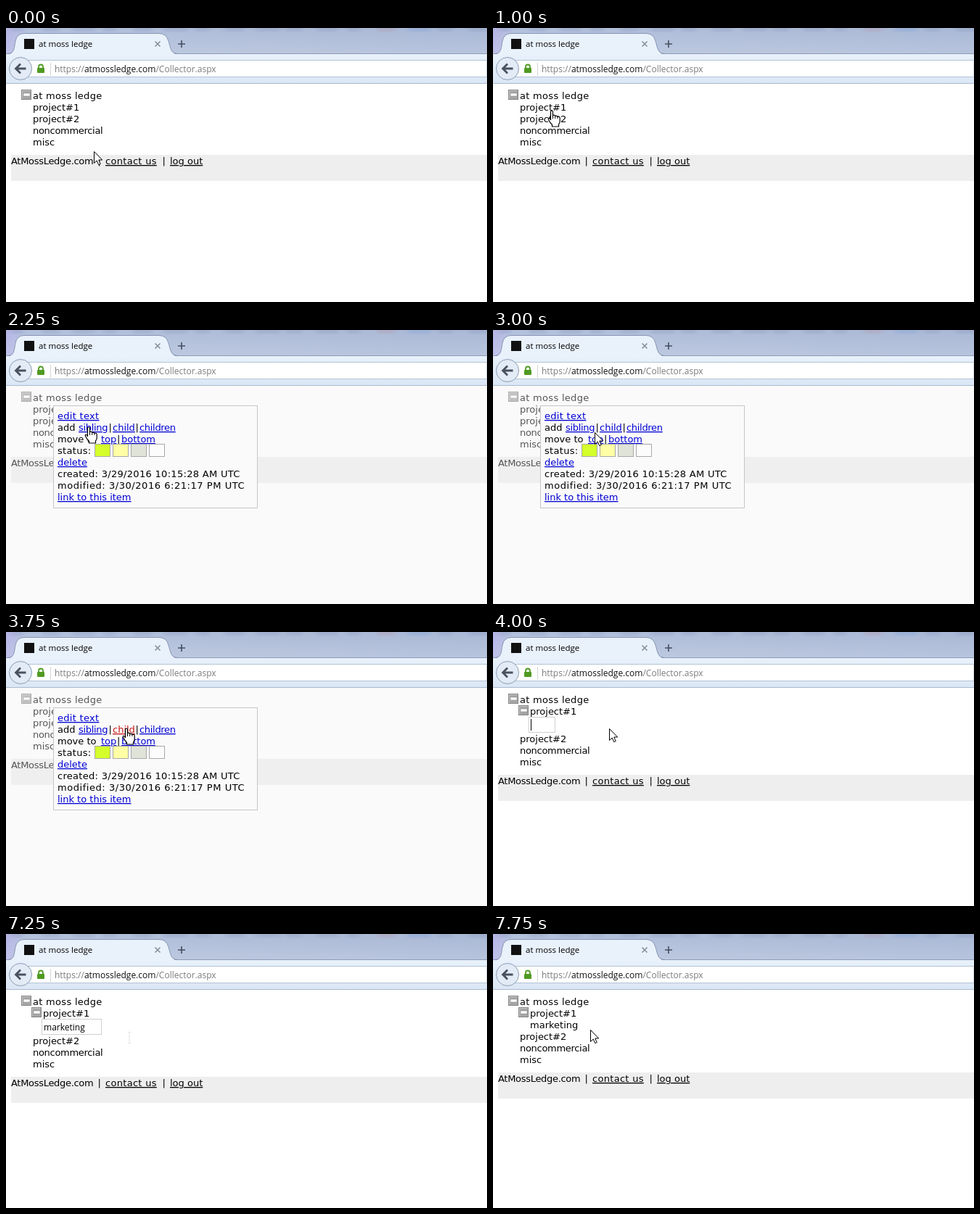
An HTML page that plays this animation: 663 by 378 pixels, repeating every 8000 ms.

```html
<!DOCTYPE html>
<html lang="en">
<head>
<meta charset="utf-8">
<title>at moss ledge</title>
<style>
html, body { margin: 0; width: 100%; height: 100%; overflow: hidden; background: #fff; }
svg { display: block; width: 663px; height: 378px; }
text { font: 13px "DejaVu Sans", sans-serif; white-space: pre; }
.ui { font: 12px "Open Sans", sans-serif; }
.tab { font-size: 11.5px; }
.u { text-decoration: underline; }
.link { fill: #0000d4; text-decoration: underline; }
.link.hot { fill: #c81414; }
.tight { letter-spacing: -.3px; }
.loose { letter-spacing: .3px; }
.wide { letter-spacing: .55px; }
</style>
</head>
<body>
<svg viewBox="0 0 663 378">
  <defs>
    <linearGradient id="sky" x2="1">
      <stop offset="0" stop-color="#b5b4e6"/>
      <stop offset=".04" stop-color="#b2c0dc"/>
      <stop offset=".6" stop-color="#adbbd7"/>
      <stop offset="1" stop-color="#a9b8d6"/>
    </linearGradient>
    <linearGradient id="shade" x2="0" y2="1">
      <stop offset="0" stop-color="#fff" stop-opacity="0"/>
      <stop offset="1" stop-color="#fff" stop-opacity=".18"/>
    </linearGradient>
    <linearGradient id="bar" x2="0" y2="1">
      <stop offset="0" stop-color="#e8f1fb"/>
      <stop offset="1" stop-color="#dbe7f5"/>
    </linearGradient>
    <filter id="blur"><feGaussianBlur stdDeviation="3 1.6"/></filter>
    <g id="fold">
      <rect x=".5" y=".5" width="13" height="13" fill="#a6a6a6" stroke="#858585"/>
      <path d="M1.500 12.500V1.500H12.500" fill="none" stroke="#c6c6c6"/>
      <rect x="3" y="5" width="9" height="4" fill="#fff" stroke="#8c8c8c" stroke-width=".6"/>
    </g>
    <path id="arrow" d="M.5 .5V16.500L4.200 13 6.700 18.700 9.200 17.600 6.800 12H11.700Z" fill="#fff" stroke="#000"/>
    <g id="hand">
      <path d="M-1.500 13V1.500Q-1.500 0 0 0T1.500 1.500V6.500Q4 5.600 4.700 7.400 7 6.600 7.800 8.400 11.200 7.600 11.200 10.500V15Q11 17.500 9.500 19V22H.5V19.500Q-2.500 16.500-4.500 12.500-5.200 10.300-3.500 10.300-2.500 10.600-1.500 13Z" fill="#fff" stroke="#000" stroke-width="1.200"/>
      <path d="M1.500 6.500V11M4.700 7.500V11M7.900 8.500V11" stroke="#000"/>
    </g>
    <path id="beam" d="M-2 -7.500H2M0 -7.500V7.500M-2 7.500H2" fill="none" stroke="#e2e2e2"/>
  </defs>

  <rect width="663" height="378" fill="#fff"/>
  <rect width="663" height="37" fill="url(#sky)"/>
  <g id="smudges" filter="url(#blur)" opacity=".25"></g>
  <rect width="663" height="37" fill="url(#shade)"/>
  <rect y="36" width="663" height="40" fill="url(#bar)"/>
  <path d="M0 35.500H6M232 35.500H663" stroke="#8d9cb8"/>
  <path d="M0 76.500H663" stroke="#a9b9cc"/>
  <path d="M2 37C12 36 11 28 13 18Q15 7.500 25 7.500H211Q221 7.500 224 18C227 28 227 36 237 37Z" fill="#e9f1fb"/>
  <path d="M2 35.500C12 35 11 28 13 18Q15 7.500 25 7.500H211Q221 7.500 224 18C227 28 227 35 237 35.500" fill="none" stroke="#8796b2"/>
  <rect x="25" y="15" width="14" height="14" fill="#111"/>
  <text class="ui tab" x="45" y="26">at moss ledge</text>
  <path d="M205.500 18.500L212.500 25.500M212.500 18.500L205.500 25.500" stroke="#868e98" stroke-width="1.600"/>
  <path d="M237 22H247M242 17V27" stroke="#444e60" stroke-width="1.600"/>
  <path d="M30 44.500H663V67.500H30Z" fill="#fff" stroke="#b4c2d4"/>
  <circle cx="20" cy="56" r="15.500" fill="#e2ebf6" stroke="#8d9db3"/>
  <path d="M27.500 56H14M20 49.500L13.500 56 20 62.500" fill="none" stroke="#48525f" stroke-width="2.800"/>
  <path d="M45 56V53.500A3 3 0 0 1 51 53.500V56" fill="none" stroke="#4f9a22" stroke-width="1.800"/>
  <rect x="43" y="55" width="10" height="7" rx="1" fill="#4f9a22"/>
  <path d="M61.500 48V66" stroke="#d4d4d4"/>
  <text class="ui" x="67" y="61" fill="#7c7c7c">https://<tspan fill="#111">atmossledge.com</tspan>/Collector.aspx</text>

  <use href="#fold" x="21" y="85"/>
  <text class="loose" x="37" y="98">at moss ledge</text>
  <use id="fold1" href="#fold" x="35" y="101"/>
  <text id="first" y="114">project#1</text>
  <text id="child" x="51" y="130">marketing</text>
  <g id="rest">
    <text x="37" y="130">project#2</text>
    <text class="tight" x="37" y="146">noncommercial</text>
    <text x="37" y="162">misc</text>
    <rect x="7" y="175" width="656" height="36" fill="#eee"/>
    <text class="tight" x="7" y="188">AtMossLedge.com</text>
    <text x="126.500" y="188">|</text>
    <text class="u loose" x="137" y="188">contact us</text>
    <text x="215.500" y="188">|</text>
    <text class="u" x="226" y="188">log out</text>
  </g>

  <g id="field">
    <rect id="box" x="49.500" y="117.500" height="21" fill="#fff" stroke="#cfcfcf"/>
    <text id="typed" class="ui" x="52" y="133"></text>
    <path id="caret" d="M.5 120V136" stroke="#000"/>
  </g>

  <g id="menu">
    <rect y="77" width="663" height="301" fill="#f1f1f1" opacity=".353"/>
    <rect x="65.500" y="104.500" width="281" height="141" fill="#fafafa" stroke="#c6c6c6"/>
    <text class="link loose" x="71" y="123">edit text</text>
    <text x="71" y="139">add</text>
    <text class="link tight" x="100" y="139">sibling</text>
    <text x="141.500" y="139">|</text>
    <text id="add" class="link" x="147" y="139">child</text>
    <text x="178.500" y="139">|</text>
    <text class="link tight" x="184" y="139">children</text>
    <text x="71" y="155">move to</text>
    <text class="link" x="131" y="155">top</text>
    <text x="153" y="155">|</text>
    <text class="link" x="159" y="155">bottom</text>
    <text class="loose" x="71" y="171">status:</text>
    <g id="swatches" stroke="#a8a8a8"></g>
    <text class="link" x="71" y="187">delete</text>
    <text class="loose" x="71" y="203">created: 3/29/2016 10:15:28 AM UTC</text>
    <text class="wide" x="71" y="219">modified: 3/30/2016 6:21:17 PM UTC</text>
    <text class="link" x="71" y="235">link to this item</text>
  </g>
  <use id="pointer"/>
</svg>
<script>
const $ = id => document.getElementById(id);
const show = (id, on) => $(id).style.display = on ? '' : 'none';
const TICK = 250, TICKS = 32;

function rect(parent, attrs) {
  const el = document.createElementNS('http://www.w3.org/2000/svg', 'rect');
  for (const k in attrs) el.setAttribute(k, attrs[k]);
  $(parent).append(el);
}

['#d4ff2a', '#ffffa6', '#e0e3d8', '#fcfcfc'].forEach((fill, i) =>
  rect('swatches', { x: 122.5 + 25 * i, y: 157.5, width: 21, height: 17, fill }));

for (let i = 0; i < 16; i++)
  rect('smudges', { x: 8 + i * 42, y: -2, width: 16 + i * 7 % 19, height: 7,
    fill: i === 12 ? '#b98a98' : i === 13 ? '#6f9ad8' : '#8290b4' });

// tick, x, y, shape
const path = [
  [0, 121, 170, 'arrow'], [1, 113, 157, 'arrow'], [2, 102, 141, 'hand'],
  [3, 90, 126, 'hand'], [4, 81, 114, 'hand'], [5, 64, 112, 'arrow'],
  [7, 75, 117, 'hand'], [8, 95, 127, 'arrow'], [9, 114, 134, 'hand'],
  [10, 124, 138, 'hand'], [11, 133, 141, 'arrow'], [12, 140, 141, 'arrow'],
  [13, 150, 138, 'hand'], [14, 160, 136, 'hand'], [15, 166, 133, 'hand'],
  [16, 160, 133, 'arrow'], [29, 170, 143, 'beam'], [30, 150, 137, 'arrow'],
  [31, 134, 132, 'arrow']
];
const letters = [2, 4, 5, 6, 8, 9];

function draw(n) {
  const menu = n >= 5 && n < 16, editing = n >= 16 && n < 30, done = n >= 30;
  show('menu', menu);
  $('add').classList.toggle('hot', n === 15);

  show('fold1', editing || done);
  $('first').setAttribute('x', editing || done ? 51 : 37);
  show('child', done);
  $('rest').setAttribute('transform', `translate(0 ${editing ? 22 : done ? 16 : 0})`);

  show('field', editing);
  if (editing) {
    const count = n < 22 ? 0 : letters[Math.min(n - 22, 5)];
    $('typed').textContent = 'marketing'.slice(0, count);
    $('box').setAttribute('width', Math.round(35.7 + count * 5.14));
    const end = count ? Math.round($('typed').getComputedTextLength()) : 0;
    $('caret').setAttribute('transform', `translate(${52 + end} 0)`);
    show('caret', n < 29 && n !== 18 && n !== 19);
  }

  const [, x, y, shape] = path.filter(p => p[0] <= n).pop();
  const pointer = $('pointer');
  pointer.setAttribute('href', '#' + shape);
  pointer.setAttribute('x', x);
  pointer.setAttribute('y', y);
}

let last = -1;
function loop() {
  const n = Math.floor(performance.now() / TICK) % TICKS;
  if (n !== last) draw(last = n);
  requestAnimationFrame(loop);
}
loop();
</script>
</body>
</html>
```
